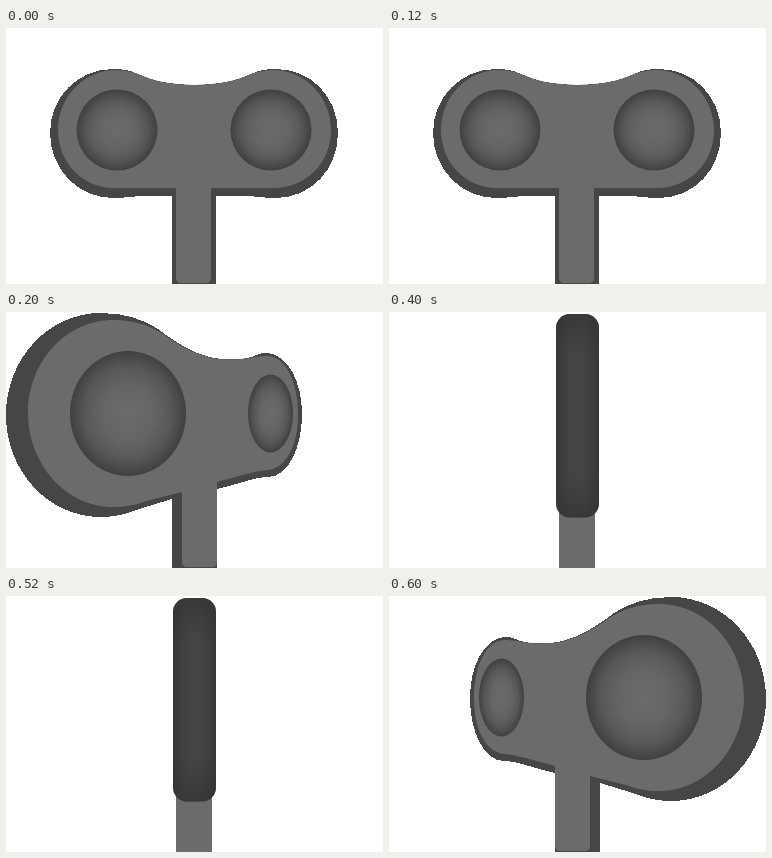
Write an HTML page that moves like this. It is 377 px wide and 256 px high and loops after 0.8 s.

```html
<!DOCTYPE html>
<html lang="en">
<head>
<meta charset="utf-8">
<title>Turning wind-up key</title>
<style>
html, body { margin: 0; width: 100%; height: 100%; overflow: hidden; background: #fff; }
svg { display: block; width: 100vw; height: 100vh; }
.side { fill: #464646; shape-rendering: crispEdges; }
.face { fill: #6b6b6b; }
.hole { fill: url(#dish); }
</style>
</head>
<body>
<svg viewBox="0 0 377 256">
  <defs>
    <radialGradient id="dish">
      <stop offset="0" stop-color="#6b6b6b"/>
      <stop offset=".45" stop-color="#656565"/>
      <stop offset=".75" stop-color="#575757"/>
      <stop offset="1" stop-color="#404040"/>
    </radialGradient>
    <linearGradient id="edge">
      <stop offset="0" stop-color="#383838"/>
      <stop offset=".35" stop-color="#444"/>
      <stop offset=".65" stop-color="#444"/>
      <stop offset="1" stop-color="#383838"/>
    </linearGradient>
    <linearGradient id="ends" x2="0" y2="1">
      <stop offset="0" stop-color="#333" stop-opacity=".7"/>
      <stop offset=".2" stop-color="#333" stop-opacity="0"/>
      <stop offset=".8" stop-color="#333" stop-opacity="0"/>
      <stop offset="1" stop-color="#333" stop-opacity=".7"/>
    </linearGradient>
  </defs>

  <g id="front">
    <path class="side" d="M188.5 57C160 56 148 53 132 46C124 42 116 41 107 41C72 41 44 69 44 105C44 141 72 170 107 170C120 170 128 168 139 168H166V256H210V168H238C249 168 257 170 270 170C305 170 332 141 332 105C332 69 305 41 270 41C261 41 253 42 245 46C229 53 217 56 188.5 57Z"/>
    <path class="face" d="M188.5 57C160 56 148 53 132 46C124 43 117 42 110 42C78 42 52 69 52 102C52 136 78 160 108 160H170V250q0 4 4 5h27q4-1 4-5V160H268C299 160 325 136 325 102C325 69 299 42 267 42C260 42 253 43 245 46C229 53 217 56 188.5 57Z"/>
    <circle class="hole" cx="111" cy="102" r="40.5"/>
    <circle class="hole" cx="265" cy="102" r="40.5"/>
  </g>

  <g id="turned">
    <path class="side" d="M0 103C0 47 42 1 95 1C120 1 138 8 152 17C172 32 190 44 215 47C235 48 246 46 250 43C254 41 258 41 262 41C282 43 296 70 296 102C296 136 282 165 262 165C250 165 240 170 211 177V256H166V187L133 197C121 202 108 205 95 205C42 205 0 159 0 103Z"/>
    <path class="face" d="M22 101C22 50 60 8 107 8C128 8 142 13 157 22C175 35 195 46 215 47C235 48 243 46 250 45C254 44 258 44 262 44C280 45 292 70 292 102C292 134 280 156 262 158C250 159 240 162 211 170V250q0 4-4 5h-27q-4-1-4-5V180L140 189C129 193 119 195 107 195C60 195 22 152 22 101Z"/>
    <ellipse class="hole" cx="122" cy="101.5" rx="58" ry="62.5"/>
    <ellipse class="hole" cx="264.5" cy="101.5" rx="22.5" ry="39"/>
  </g>

  <g id="profile">
    <path class="face" d="M170 195H206V256H170Z"/>
    <rect x="167" y="2" width="43" height="203.5" rx="14" fill="url(#edge)"/>
    <rect x="167" y="2" width="43" height="203.5" rx="14" fill="url(#ends)"/>
  </g>
</svg>
<script>
const LOOP = 800, POSES = 4;
const [front, turned, profile] = ["front", "turned", "profile"].map(id => document.getElementById(id));
const show = (part, on) => part.setAttribute("visibility", on ? "visible" : "hidden");

// The key turns a quarter step at a time, holding each pose.
function draw(time) {
  const pose = Math.floor((time % LOOP) / LOOP * POSES);
  show(front, pose === 0);
  show(turned, pose % 2 === 1);
  show(profile, pose === 2);
  turned.setAttribute("transform", pose === 3 ? "matrix(-1 0 0 1 377 0)" : "");
}

const start = performance.now();
function tick() {
  draw(performance.now() - start);
  requestAnimationFrame(tick);
}
tick();
</script>
</body>
</html>
```
